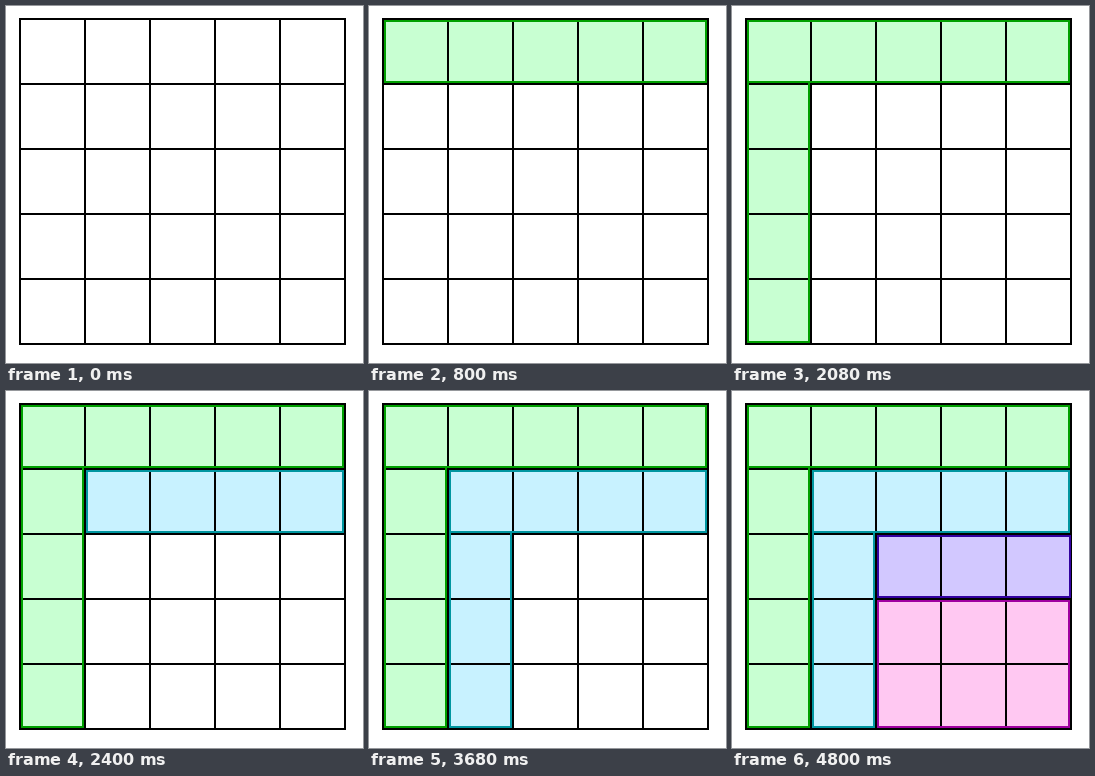
Animation of 357 by 357 pixels, one loop 5.6 s. Source, as an HTML page with a canvas:

```html
<!DOCTYPE html>
<html lang="en">
<head>
<meta charset="utf-8">
<title>Square split into strips</title>
<style>
  html, body { margin: 0; width: 100%; height: 100%; overflow: hidden; background: #fff; }
  canvas { display: block; }
</style>
</head>
<body>
<canvas id="stage" width="357" height="357"></canvas>
<script>
const ctx = document.getElementById('stage').getContext('2d');
const STEP = 800, STEPS = 7, CELL = 65, LEFT = 14, TOP = 13, SIZE = 5 * CELL;

const GREEN = ['#c8ffd2', '#00a000'];
const CYAN = ['#c8f2ff', '#0096a0'];
const PURPLE = ['#d2c8ff', '#3200a0'];
const PINK = ['#ffc8f2', '#a000a0'];

// Outer pixel edges; open strips continue the strip above them.
const strips = [
  { x: 15, y: 14, right: 338, bottom: 77, colors: GREEN },
  { x: 15, y: 77, right: 78, bottom: 337, colors: GREEN, open: true },
  { x: 80, y: 79, right: 338, bottom: 142, colors: CYAN },
  { x: 80, y: 142, right: 143, bottom: 337, colors: CYAN, open: true },
  { x: 145, y: 144, right: 339, bottom: 207, colors: PURPLE },
  { x: 145, y: 209, right: 338, bottom: 337, colors: PINK },
];

function fillStrip({ x, y, right, bottom, colors }) {
  ctx.fillStyle = colors[0];
  ctx.fillRect(x, y, right - x, bottom - y);
}

function outlineStrip({ x, y, right, bottom, colors, open }) {
  const top = open ? y : y + 1;
  ctx.strokeStyle = colors[1];
  ctx.beginPath();
  ctx.moveTo(x + 1, top);
  ctx.lineTo(x + 1, bottom - 1);
  ctx.lineTo(right - 1, bottom - 1);
  ctx.lineTo(right - 1, top);
  if (!open) ctx.closePath();
  ctx.stroke();
}

function drawGrid() {
  ctx.fillStyle = '#000';
  for (let i = 0; i <= 5; i++) {
    ctx.fillRect(LEFT - 1 + i * CELL, TOP - 1, 2, SIZE + 2);
    ctx.fillRect(LEFT - 1, TOP - 1 + i * CELL, SIZE + 2, 2);
  }
}

function draw(time) {
  const shown = strips.slice(0, Math.floor(time / STEP) % STEPS);
  ctx.fillStyle = '#fff';
  ctx.fillRect(0, 0, 357, 357);
  ctx.lineWidth = 2;
  shown.forEach(fillStrip);
  drawGrid();
  shown.forEach(outlineStrip);
}

const start = performance.now();
function tick() {
  draw(performance.now() - start);
  requestAnimationFrame(tick);
}
tick();
</script>
</body>
</html>
```
